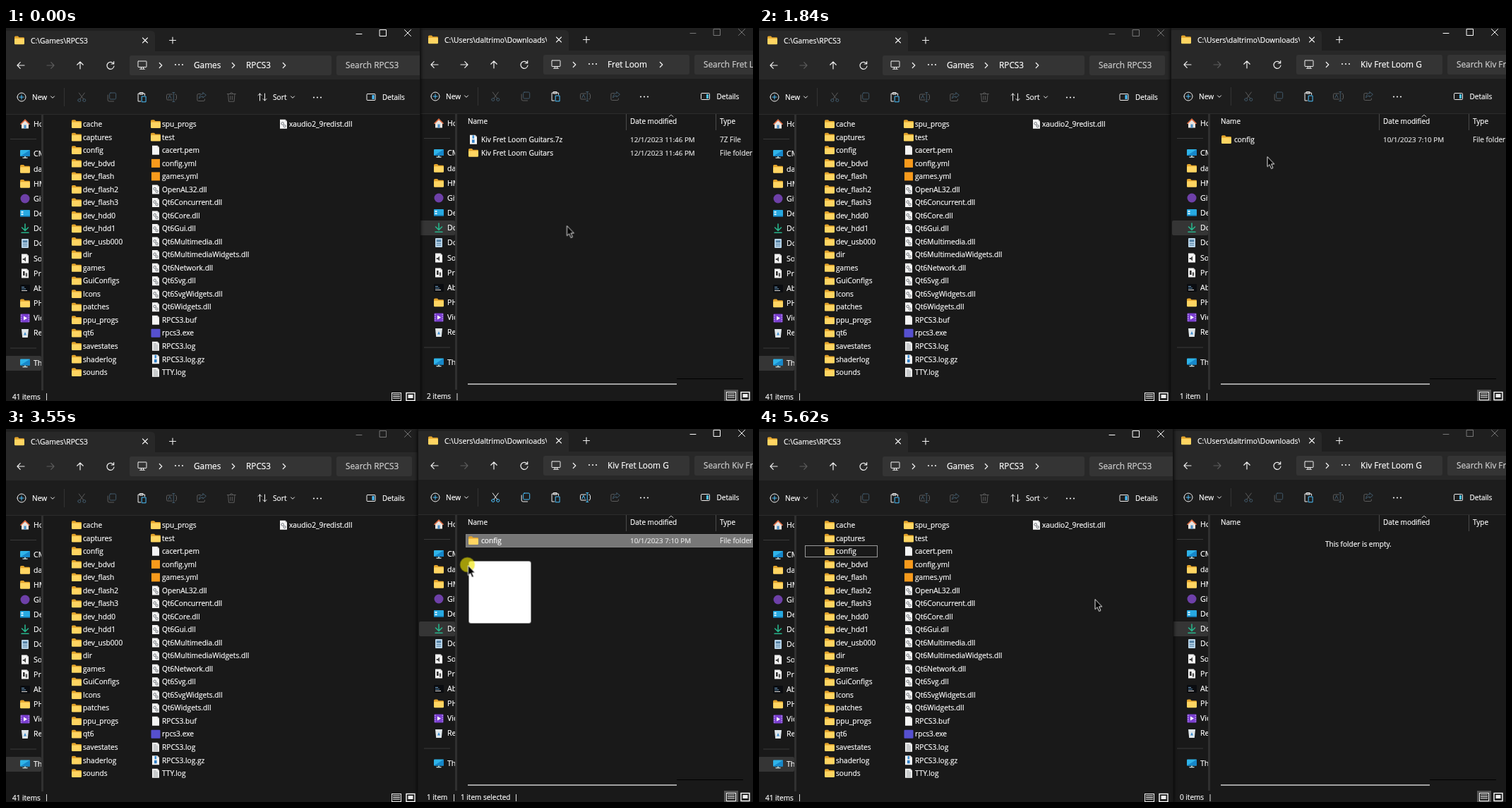
An HTML page for the animation above (6.81 s loop, 1058 by 529 pixels).

```html
<!DOCTYPE html>
<html lang="en">
<head>
<meta charset="utf-8">
<title>Moving a folder between two windows</title>
<style>
  html, body { margin: 0; width: 100%; height: 100%; overflow: hidden; background: #191919; }
  #stage { position: relative; width: 1058px; height: 529px; overflow: hidden; }
  .win, #top { position: absolute; top: 0; height: 529px; overflow: hidden; }
  .win { box-shadow: 0 0 5px #000; background: #191919; }
  #a { left: 0; width: 587px; }
  #b { left: 583px; width: 475px; z-index: 2; }
  #top { left: 0; width: 1058px; z-index: 9; }
  svg { display: block; }
  text { font-family: 'Open Sans', 'Noto Sans', sans-serif; white-space: pre; stroke-width: .18px; }
  .ln { fill: none; stroke: currentColor; stroke-linecap: round; stroke-linejoin: round; }
  .ac { stroke: var(--ac); }
  .lit { color: #f0f0f0; --ac: #4cc2ff; }
  .dim { color: #5c5c5c; --ac: #41596a; }
</style>
</head>
<body>
<div id="stage">
  <div class="win" id="a"></div>
  <div class="win" id="b"></div>
  <div id="top"></div>
</div>
<script>
const LOOP = 6810, END = LOOP;
const css = [];

function keyframes(sel, name, steps) {
  const body = steps.map(([t, rule]) => `${t / LOOP * 100}%{${rule}}`).join('');
  css.push(`@keyframes ${name}{${body}}${sel}{animation:${name} ${LOOP}ms step-end infinite}`);
}

// Shows a class only inside the given [from, to] spans (ms).
function show(name, ...spans) {
  const steps = [[0, 'opacity:0']];
  for (const [from, to] of spans) steps.push([from, 'opacity:1'], [to, 'opacity:0']);
  keyframes('.' + name, name, steps);
}

show('left-on', [0, 820], [4160, END]);
show('right-on', [820, 4160]);
show('press', [820, 970], [1440, 1510], [1570, 1640], [2590, 2720], [3260, 4160], [5490, 5620]);
show('drag', [3410, 4160]);
show('hint', [3680, 4160]);
show('parent', [0, 1770]);
show('child', [1770, END]);
show('one', [1770, 4360]);
show('empty', [4360, END]);
show('hover1', [1300, 1440]);
show('pick1', [1440, 1770]);
show('hover2', [2110, 2590]);
show('pick2', [2590, 4360]);
show('tools-b', [1440, 1770], [2590, 4360]);
show('notools-b', [0, 1440], [1770, 2590], [4360, END]);
show('tools-a', [4430, 5490]);
show('notools-a', [0, 4430], [5490, END]);
show('moved', [4360, 5490]);
show('outline', [4160, 4360], [5490, END]);
keyframes('#a', 'order', [[0, 'z-index:3'], [820, 'z-index:1'], [4160, 'z-index:3']]);

const path = [];
let tip;
function put(t, x, y) {
  tip = [x, y];
  path.push([t, `transform:translate(${x.toFixed(1)}px,${y.toFixed(1)}px)`]);
}
function glide(t0, t1, n, x, y) {
  const [x0, y0] = tip;
  for (let i = 1; i <= n; i++) {
    const p = Math.sin(Math.PI / 2 * (i / n) ** 0.9) ** 2;
    put(t0 + (t1 - t0) * (i - 1) / (n - 1), x0 + (x - x0) * p, y0 + (y - y0) * p);
  }
}
put(0, 794.5, 280.5);
glide(70, 690, 10, 718.5, 188.5);
put(1300, 720, 182.5);
put(1970, 720, 186);
glide(2040, 2320, 5, 784.5, 164);
glide(3410, 3820, 7, 494, 230);
glide(3890, 3960, 2, 476, 241.5);
keyframes('#pointer', 'pointer', path);

// Drawing helpers
const g = (cls, body) => `<g class="${cls}">${body}</g>`;
const at = (x, y, body) => `<g transform="translate(${x} ${y})">${body}</g>`;
const rect = (x, y, w, h, fill, rx = 0, more = '') =>
  `<rect x="${x}" y="${y}" width="${w}" height="${h}" rx="${rx}" fill="${fill}" ${more}/>`;
const line = (d, w = 1, more = '') => `<path class="ln ${more}" d="${d}" stroke-width="${w}"/>`;
const shape = (d, fill) => `<path d="${d}" fill="${fill}"/>`;
const dot = (x, y, r, fill) => `<circle cx="${x}" cy="${y}" r="${r}" fill="${fill}"/>`;
const text = (x, y, s, size = 10.2, fill = '#fff') =>
  `<text x="${x}" y="${y + size * 0.36}" font-size="${size}" fill="${fill}" stroke="${fill}">${s}</text>`;
const clip = (x, w, body) =>
  `<svg x="${x}" width="${w}" height="529" viewBox="${x} 0 ${w} 529">${body}</svg>`;
const svg = (w, body) => `<svg width="${w}" height="529" viewBox="0 0 ${w} 529">${body}</svg>`;
const dots = (x, y) => [-5, 0, 5].map(d => dot(x + d, y, 1.1, '#f0f0f0')).join('');
const down = (x, y) => at(x, y, line('M-2.5-1.2L0 1.3L2.5-1.2'));
const next = (x, y) => at(x, y, line('M-1.7-3.5L1.8 0L-1.7 3.5', 1.2));

const tool = {
  cut: line('M-4-6L2.4 2.8M4-6L-2.4 2.8') + line('M-5.5 4.5a2 2 0 1 0 4 0a2 2 0 1 0-4 0M1.5 4.5a2 2 0 1 0 4 0a2 2 0 1 0-4 0', 1, 'ac'),
  copy: line('M-1.5-6H4.5Q6-6 6-4.5V1.5Q6 3 4.5 3H-1.5Q-3 3-3 1.5V-4.5Q-3-6-1.5-6Z', 1, 'ac') + line('M-5.5-3V4Q-5.5 6-3.5 6H3'),
  paste: line('M4.5-2.5V-5H-5V6H-1.5M-2.5-6.5H2V-4H-2.5Z') + line('M.5-1H6V6.8H.5Z', 1, 'ac'),
  rename: line('M.8-4H-5.5Q-7-4-7-2.5V2.5Q-7 4-5.5 4H.8M5-4Q7-4 7-2.5V2.5Q7 4 5 4') + line('M2.8-6.5V6.5M1.3-6.5H4.3M1.3 6.5H4.3M-4.7 2L-2.6-2.6L-.5 2', 1, 'ac'),
  share: line('M-1.5-4.5H-4.5Q-6-4.5-6-3V4Q-6 5.5-4.5 5.5H3Q4.5 5.5 4.5 4V3') + line('M2-6.5L6.5-2.8L2 1V-1Q-2-1-3.3 2Q-2.5-4.5 2-4.5Z', 1, 'ac'),
  bin: line('M-6-4.5H6M-1.8-4.5Q-1.8-6.5 0-6.5Q1.8-6.5 1.8-4.5M-4.7-4.5L-3.8 6.3H3.8L4.7-4.5M-1.3-1.5V3.5M1.3-1.5V3.5')
};
const screen = line('M-5.5-5.5H5.5Q6-5.5 6-5V2.5Q6 3 5.5 3H-5.5Q-6 3-6 2.5V-5Q-6-5.5-5.5-5.5M-1.5 3V5.5M1.5 3V5.5M-3.5 5.7H3.5');

// File icons, centred on 0,0
const sheet = shape('M-5-6.5H2.5L5-4V6.5H-5Z', '#f4f4f4') + shape('M2.5-6.5V-4H5Z', '#bdbdbd');
const icon = {
  folder: shape('M-7-4.5Q-7-6-5.5-6H-2L-.5-4.3H5.5Q7-4.3 7-3V3H-7Z', '#e2a32b') + rect(-7, -2.8, 14, 8.5, '#ffd562', 1.2),
  sheet,
  dll: sheet + '<g fill="none" stroke="#6d7278"><circle cx="-1.3" cy="-.8" r="1.8"/><circle cx="1.6" cy="2.8" r="1.6"/></g>',
  log: sheet + '<path d="M-3.3-3.5H1M-3.3-1.5H3.3M-3.3.5H3.3M-3.3 2.5H3.3M-3.3 4.5H3.3" stroke="#8a8f94" stroke-width=".8"/>',
  zip: sheet + rect(-1.5, -6, 2.6, 4.5, '#3c8fd4') + rect(-2, 0, 3.6, 4.5, '#2f7fc8'),
  yml: rect(-6, -6, 12, 12, '#f79a1c'),
  exe: rect(-6.5, -6, 13, 12, '#5650cf', 1),
  home: shape('M-6.5 0L0-6.5L6.5 0L5 1V6.5H-5V1Z', '#e9e4df') + shape('M-7 .3L0-6.8L7 .3L6 1.3L0-4.6L-6 1.3Z', '#e0663a') + rect(-1.5, 1.5, 3, 5, '#4a90c9'),
  pc: rect(-7, -5.5, 14, 9, '#2fb4e9', 1) + shape('M-7 3.5L7-5.5V3.5Z', '#1787c9') + rect(-1, 3.5, 2, 2, '#9bb') + rect(-3.5, 5, 7, 1.3, '#cdd'),
  git: dot(0, 0, 6.5, '#6e40a8'),
  desk: rect(-7, -5, 14, 10, '#27a9e1', 1) + rect(-5.5, -3, 3, 2, '#d8f2ff') + rect(-5.5, .2, 3, 2, '#d8f2ff') + rect(-7, 3.5, 14, 1.5, '#126a9c'),
  down: '<g color="#27b38a">' + line('M0-6V3M-4.5-1L0 3.3L4.5-1M-5 6.2H5', 1.6) + '</g>',
  doc: rect(-5, -6.5, 10, 13, '#b9d4e8', 1) + rect(-3.2, -4.2, 6.4, 3, '#4f7ea3') + '<path d="M-3.2 1H3.2M-3.2 3.5H3.2" stroke="#4f7ea3"/>',
  sound: sheet + shape('M-3.3 0H-1.5L1 -2.5V4.5L-1.5 2H-3.3Z', '#444'),
  parts: sheet + rect(-3, -3, 2.6, 6, '#333') + rect(.8, -.5, 2.4, 5, '#555'),
  term: rect(-7, -5.5, 14, 11, '#0a0c10', 1) + '<path d="M-5-2H-1M-5 .5H1" stroke="#6fa0c8"/><path d="M-5 3H3" stroke="#ddd"/>',
  video: rect(-6.5, -6, 13, 12, '#7b3fd0', 1) + shape('M-2-3L3 0L-2 3Z', '#fff') + '<path d="M-5.2-5V5M5.2-5V5" stroke="#d9c4f5" stroke-dasharray="1.5 1.5"/>',
  trash: shape('M-5-5.5H5L3.8 6.5H-3.8Z', '#dfe6ea') + shape('M-2 3L0-1.5L2 3Z', '#3d8ed0')
};

const places = [
  ['home', 'Home', 136], ['pc', 'CM', 178.5], ['folder', 'da', 200], ['folder', 'HM', 221], ['git', 'Git', 242],
  ['desk', 'Desk', 263], ['down', 'Down', 284], ['doc', 'Docs', 305.5], ['sound', 'Sou', 327], ['parts', 'Pro', 348],
  ['term', 'Abo', 369.5], ['folder', 'PH', 390.5], ['video', 'Vid', 411.5], ['trash', 'Rec', 432.5], ['pc', 'This', 475]
];

const buttons = (x, color) => `<g color="${color}">` +
  at(x, 8, line('M-4 .5H4')) + at(x + 34, 7, line('M-4.5-4.5H4.5V4.5H-4.5Z')) +
  at(x + 69, 7, line('M-4.5-4.5L4.5 4.5M4.5-4.5L-4.5 4.5')) + '</g>';

function tools(names, id) {
  const row = lit => names.map((n, i) => {
    const on = n === 'paste' || (lit && n !== 'share');
    return at(107.3 + 42.4 * i, 98, g(on ? 'lit' : 'dim', tool[n]));
  }).join('');
  return g('notools-' + id, row(false)) + g('tools-' + id, row(true));
}

const viewIcons = x =>
  at(x, 523, rect(-6.5, -5.5, 13, 11, '#222', 0, 'stroke="#eee"') + '<path d="M-5-3H5M-5-.5H5M-5 2H5" stroke="#eee"/>') +
  at(x + 20, 523, rect(-6, -5.5, 12, 11, '#1a1a1a', 0, 'stroke="#fff" stroke-width="1.4"') + rect(-3.5, -3, 7, 5, '#eee'));

// Everything both windows share; x = 0 is the inner left edge.
function frame(o) {
  const back = rect(-3, -1, 600, 35, '#1f1f1f') + shape('M-3 34V5Q-3 4 0 4H205Q211 4 211 10V34Z', '#282828') +
    rect(-3, 33, 600, 40, '#282828') + rect(-3, 73, 600, 49, '#1d1d1d') + rect(-3, 122, 600, 1, '#2c2c2c') +
    rect(175, 39, o.addrW, 28, '#343434', 3) + rect(o.searchX, 39, 107, 28, '#343434', 3);
  const tab = at(19, 17.5, icon.folder) + clip(35, 145, text(35, 18, o.title, 10.3)) +
    at(197, 17.5, line('M-3.5-3.5L3.5 3.5M3.5-3.5L-3.5 3.5', 1.1)) + at(236, 17.5, line('M-4.5 0H4.5M0-4.5V4.5', 1.1));
  const nav = at(21, 53, line('M5 0H-5M-.8-4.3L-5 0L-.8 4.3', 1.2)) + o.forward +
    at(105, 53, line('M0 5V-5M-4.3-.8L0-5L4.3-.8', 1.2)) +
    at(148, 53, line('M4.3-2.3A5 5 0 1 0 5 1M4.7-5.5V-2H1.2', 1.2)) +
    at(193, 52.5, screen) + next(219, 53) + dots(245, 52) + o.crumbs;
  const bar = at(22, 98, line('M-6 0a6 6 0 1 0 12 0a6 6 0 1 0-12 0') + '<g style="--ac:#4cc2ff">' + line('M-3 0H3M0-3V3', 1, 'ac') + '</g>') +
    text(37, 98, 'New') + down(66, 98) + rect(82, 85, 1, 26, '#333') + tools(o.tools, o.id) + dots(o.moreX, 98.5) +
    at(o.detailX, 98, line('M-5-4.5H5Q6-4.5 6-3.5V3.5Q6 4.5 5 4.5H-5Q-6 4.5-6 3.5V-3.5Q-6-4.5-5-4.5') + rect(1.5, -3, 3, 6, '#4cc2ff')) +
    text(o.detailX + 16, 98, 'Details', 10);
  const side = rect(-1, o.markY, 51, 21, '#353535', 2) + rect(6, 157, 37, 1, '#3a3a3a') + rect(6, 453.5, 37, 1, '#3a3a3a') +
    clip(0, 50, places.map(([k, s, y]) => at(27, y, icon[k]) + text(39, y, s, 10.6)).join('')) +
    rect(50, 123, 3, 391, '#303030');
  return g('lit', back + tab + nav + bar + side + o.body);
}

const forwardIcon = cls => g(cls, at(63, 53, line('M-5 0H5M.8-4.3L5 0L.8 4.3', 1.2)));
const tick = x => rect(x, 518, 1, 10, '#ddd');

// Left window
const columns = [
  ['cache', 'captures', 'config', 'dev_bdvd', 'dev_flash', 'dev_flash2', 'dev_flash3', 'dev_hdd0', 'dev_hdd1', 'dev_usb000',
    'dir', 'games', 'GuiConfigs', 'Icons', 'patches', 'ppu_progs', 'qt6', 'savestates', 'shaderlog', 'sounds'],
  ['spu_progs', 'test', 'cacert.pem', 'config.yml', 'games.yml', 'OpenAL32.dll', 'Qt6Concurrent.dll', 'Qt6Core.dll', 'Qt6Gui.dll',
    'Qt6Multimedia.dll', 'Qt6MultimediaWidgets.dll', 'Qt6Network.dll', 'Qt6Svg.dll', 'Qt6SvgWidgets.dll', 'Qt6Widgets.dll',
    'RPCS3.buf', 'rpcs3.exe', 'RPCS3.log', 'RPCS3.log.gz', 'TTY.log'],
  ['xaudio2_9redist.dll']
];
const kinds = { dll: 'dll', yml: 'yml', exe: 'exe', log: 'log', gz: 'zip', pem: 'sheet', buf: 'sheet' };
const kind = name => name.includes('.') ? kinds[name.split('.').pop()] : 'folder';
const colX = [100, 212, 393], labelX = [109, 221, 401];
const files = columns.map((names, c) => names.map((name, i) => {
  const y = 136.3 + 18.53 * i;
  return at(colX[c], y, icon[kind(name)]) + text(labelX[c], y, name);
}).join('')).join('');

const left = frame({
  id: 'a', title: 'C:\\Games\\RPCS3', addrW: 286, searchX: 468, moreX: 441, detailX: 517, markY: 465,
  tools: ['cut', 'copy', 'paste', 'rename', 'share', 'bin'],
  forward: g('dim', forwardIcon('')),
  crumbs: text(266, 53, 'Games', 11.8) + next(322, 53) + text(340, 53, 'RPCS3', 11.8) + next(394, 53) +
    g('left-on', rect(570, 39, 17, 28, '#343434')) + text(481, 53, 'Search RPCS3', 11.8, '#d0d0d0'),
  body: g('left-on', buttons(500, '#fff')) + g('right-on', buttons(500, '#777')) +
    at(363, 98, line('M-3.5 5V-5M-6-2.5L-3.5-5L-1-2.5M3.5-5V5M1 2.5L3.5 5L6 2.5')) + text(378, 98, 'Sort') + down(406, 98) +
    g('moved', rect(66.5, 165.5, 101, 16, '#777', 0, 'stroke="#848484"')) +
    g('outline', rect(65.5, 165.5, 102, 16, 'none', 0, 'stroke="#9a9a9a"')) + files +
    text(9, 523.5, '41 items', 10) + tick(57) +
    g('tools-a', text(67, 523.5, '1 item selected', 10) + tick(145.5)) + viewIcons(553)
});
document.getElementById('a').innerHTML = svg(587, left + rect(586, 0, 1, 529, '#141414'));

// Right window; list parts below use stage coordinates
const row = (y, k, name, date, type) => at(662, y, icon[k]) + text(673, y, name) + text(884, y, date, 9.85, '#e8e8e8') + text(1011, y, type, 10, '#e8e8e8');
const hover = y => rect(651, y, 410, 19, '#4b4b4b');
const pick = y => rect(651.5, y + .5, 410, 18, '#777', 0, 'stroke="#848484"');
const stamp = '12/1/2023 11:46 PM';

const list = text(654, 132.6, 'Name', 10) + text(884, 132.6, 'Date modified', 10) + text(1011, 132.6, 'Type', 10) +
  rect(878, 122, 1, 23, '#4a4a4a') + rect(1005, 122, 1, 23, '#4a4a4a') + at(942, 124.5, line('M-3 1.3L0-1.3L3 1.3', .8)) +
  g('hover1', hover(168)) + g('pick1', pick(168)) + g('hover2', hover(149)) + g('pick2', pick(149)) +
  g('parent', row(158.3, 'zip', 'Kiv Fret Loom Guitars.7z', stamp, '7Z File') + row(177, 'folder', 'Kiv Fret Loom Guitars', stamp, 'File folder')) +
  g('one', row(158.3, 'folder', 'config', '10/1/2023 7:10 PM', 'File folder')) +
  g('empty', text(802, 163.8, 'This folder is empty.', 10)) +
  rect(654, 504, 296, 2, '#a0a0a0') + rect(950, 497, 94, 1, '#000') +
  g('parent', text(596, 522.5, '2 items', 10) + tick(638.5)) +
  g('one', text(596, 522.5, '1 item', 10) + tick(634)) +
  g('empty', text(596, 522.5, '0 items', 10) + tick(638.5)) +
  g('pick1', text(649, 522.5, '1 item selected', 10) + tick(727)) +
  g('pick2', text(644, 522.5, '1 item selected', 10) + tick(722)) + rect(1017, 513, 20, 17, '#555');

const right = frame({
  id: 'b', title: 'C:\\Users\\daltrimo\\Downloads\\', addrW: 207, searchX: 389, moreX: 318, detailX: 404.5, markY: 274,
  tools: ['cut', 'copy', 'paste', 'rename', 'share'],
  forward: forwardIcon('parent') + g('dim', forwardIcon('child')),
  crumbs: g('parent', text(266, 53, 'Fret Loom', 11.8) + next(342, 53) + text(402, 53, 'Search Fret Loom', 11.8, '#d0d0d0')) +
    g('child', text(266, 53, 'Kiv Fret Loom G', 11.8) + text(402, 53, 'Search Kiv Fret Loom', 11.8, '#d0d0d0')),
  body: g('right-on', buttons(387, '#fff')) + g('left-on', buttons(387, '#777')) +
    at(-586, 1, list) + viewIcons(441)
});
document.getElementById('b').innerHTML = svg(475, at(3, -1, right) + rect(0, 0, 1, 529, '#141414'));

// Pointer with click ring, drag image and drop hint
const hint = rect(12.5, 8.5, 94, 16, '#fff', 2, 'stroke="#bbb"') +
  '<g color="#222">' + at(20, 16.2, line('M-4.5 0H5M1.5-3.5L5 0L1.5 3.5', 1.1)) + '</g>' +
  text(30, 16.2, 'Move to <tspan fill="#15157a">RPCS3</tspan>', 10.2, '#2a2ab8');
document.getElementById('top').innerHTML = svg(1058, `<g id="pointer">` +
  g('drag', rect(1, -6, 88, 88, '#fff', 3)) +
  g('press', dot(-1, -1, 10.5, 'rgba(240,228,0,.64)')) +
  g('hint', hint) +
  '<path d="M0 0V14.2L3.2 11.3L5.6 16.9L8 15.9L5.6 10.4H9.8Z" fill="#000" stroke="#fff" stroke-width=".9"/></g>');

const style = document.createElement('style');
style.textContent = css.join('\n');
document.head.append(style);
</script>
</body>
</html>
```
